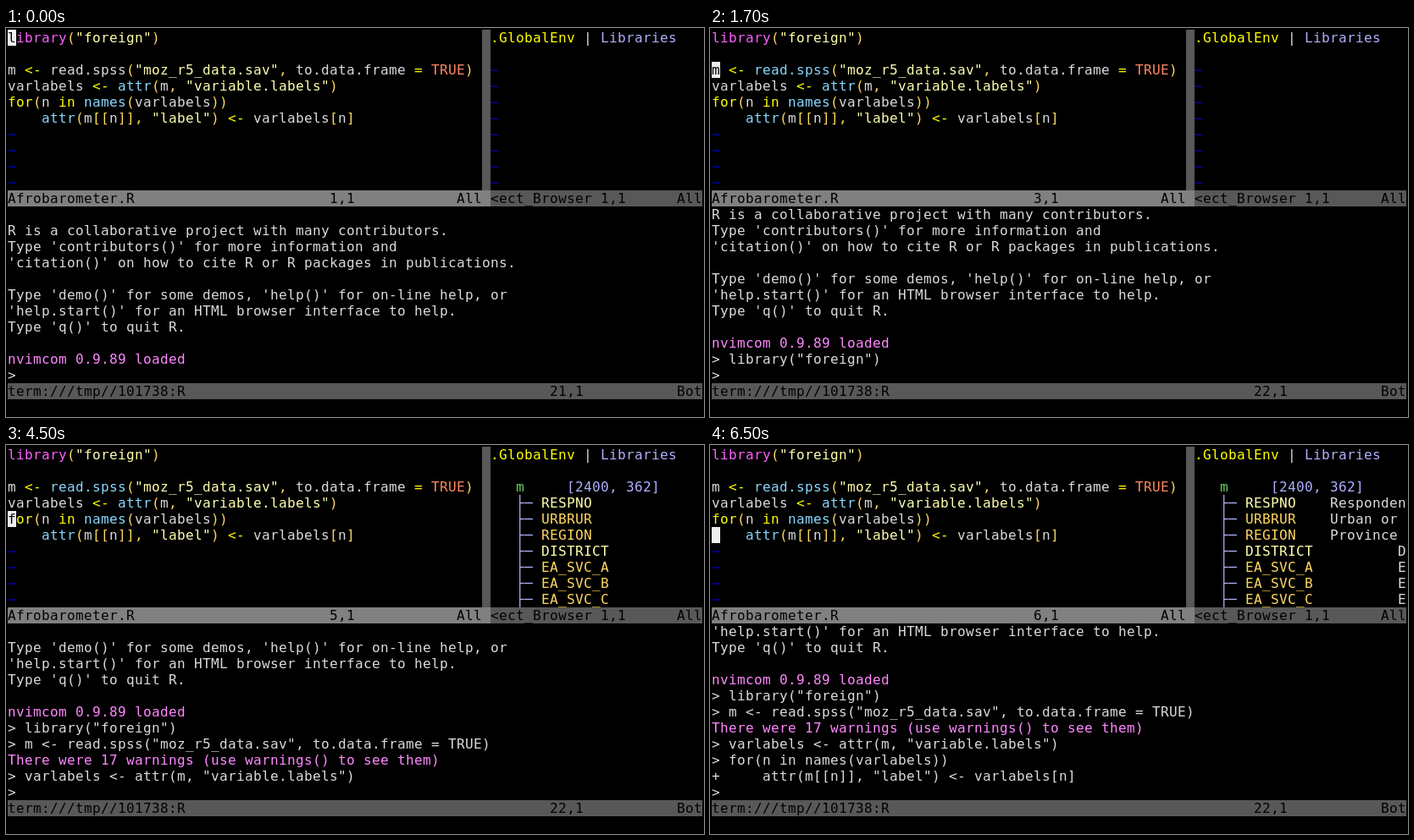
Animation, 824 px wide and 460 px high, one loop 8000 ms. Source, as an HTML page:

```html
<!DOCTYPE html>
<html lang="en">
<head>
<meta charset="utf-8">
<title>R session</title>
<style>
html, body { margin: 0; width: 100%; height: 100%; overflow: hidden; background: #000; }
#term {
  position: absolute; left: 2px; top: 2px; width: 820px; height: 456px;
  font: 16px/19px "DejaVu Sans Mono", monospace;
  letter-spacing: calc(10px - 1ch);
  color: #dadada;
}
#term span { position: absolute; height: 19px; white-space: pre; }
</style>
</head>
<body>
<div id="term"></div>
<script>
const CW = 10, CH = 19, LOOP = 8000;
const C = {
  text: '#dadada', pink: '#ff5fff', msg: '#ff87ff', gold: '#ffd75f', string: '#ffffaf',
  key: '#ffff00', func: '#87d7ff', bool: '#ff875f', tilde: '#0000cd', lilac: '#afafff',
  green: '#5fd75f', active: '#808080', idle: '#585858', cursor: '#eeeeee', black: '#000'
};

const script = [
  'library("foreign")',
  '',
  'm <- read.spss("moz_r5_data.sav", to.data.frame = TRUE)',
  'varlabels <- attr(m, "variable.labels")',
  'for(n in names(varlabels))',
  '    attr(m[[n]], "label") <- varlabels[n]'
];

const log = [
  '',
  'R is a collaborative project with many contributors.',
  "Type 'contributors()' for more information and",
  "'citation()' on how to cite R or R packages in publications.",
  '',
  "Type 'demo()' for some demos, 'help()' for on-line help, or",
  "'help.start()' for an HTML browser interface to help.",
  "Type 'q()' to quit R.",
  '',
  'nvimcom 0.9.89 loaded',
  '> ' + script[0],
  '> ' + script[2],
  'There were 17 warnings (use warnings() to see them)',
  '> ' + script[3],
  '> ' + script[4],
  '+ ' + script[5]
];

const columns = [
  ['RESPNO', C.string, 73, 'Responden'],
  ['URBRUR', C.gold, 73, 'Urban or'],
  ['REGION', C.gold, 73, 'Province'],
  ['DISTRICT', C.string, 81, 'D'],
  ['EA_SVC_A', C.gold, 81, 'E'],
  ['EA_SVC_B', C.gold, 81, 'E'],
  ['EA_SVC_C', C.gold, 81, 'E']
];

// at: start time, row: cursor row, lines: console lines so far, tree: browser detail
const steps = [
  { at: 0, row: 0, lines: 10, tree: 0 },
  { at: 500, row: 2, lines: 11, tree: 0 },
  { at: 2500, row: 3, lines: 13, tree: 1 },
  { at: 4500, row: 4, lines: 14, tree: 1 },
  { at: 6500, row: 5, lines: 16, tree: 2 }
];

const term = document.getElementById('term');

function put(col, row, text, color = C.text, bg, cells) {
  const s = document.createElement('span');
  s.textContent = text;
  s.style.left = col * CW + 'px';
  s.style.top = row * CH + 'px';
  s.style.color = color;
  if (bg) {
    s.style.background = bg;
    s.style.width = cells * CW + 'px';
  }
  term.append(s);
}

function tokenColor(tok, loaded) {
  if (tok[0] === '"') return C.string;
  if (tok === 'library') return C.pink;
  if (tok === 'TRUE') return C.bool;
  if (tok === 'read.spss') return loaded ? C.func : C.text;
  if (/^(attr|names)$/.test(tok)) return C.func;
  if (/^(for|in|<-|=)$/.test(tok)) return C.key;
  if (/^[()[\],]$/.test(tok)) return C.gold;
  return C.text;
}

function drawCode(line, row, loaded) {
  for (const m of line.matchAll(/"[^"]*"|[\w.]+|<-|[^\s]/g))
    put(m.index, row, m[0], tokenColor(m[0], loaded));
}

function drawEditor(step) {
  script.forEach((line, row) => drawCode(line, row, step.at > 0));
  for (let row = 6; row < 10; row++) put(0, row, '~', C.tilde);
  put(0, step.row, script[step.row][0], C.black, C.cursor, 1);
  for (let row = 0; row < 10; row++) put(56, row, '', C.text, C.idle, 1);
  put(0, 10, 'Afrobarometer.R', C.black, C.active, 57);
  put(38, 10, step.row + 1 + ',1', C.black);
  put(53, 10, 'All', C.black);
}

function drawBrowser(step) {
  put(57, 0, '.GlobalEnv', C.key);
  put(68, 0, '|');
  put(70, 0, 'Libraries', C.lilac);
  if (step.tree) {
    put(60, 2, 'm', C.green);
    put(66, 2, '[2400, 362]', C.lilac);
    columns.forEach(([name, color, col, label], i) => {
      put(60, 3 + i, '├─', C.lilac);
      put(63, 3 + i, name, color);
      if (step.tree > 1) put(col, 3 + i, label);
    });
  } else {
    for (let row = 2; row < 10; row++) put(57, row, '~', C.tilde);
  }
  put(57, 10, '<ect_Browser 1,1', C.black, C.idle, 25);
  put(79, 10, 'All', C.black);
}

function drawConsole(step) {
  log.slice(step.lines - 10, step.lines).forEach((line, i) =>
    put(0, 11 + i, line, /^(nvimcom|There)/.test(line) ? C.msg : C.text));
  put(0, 21, '>');
  put(0, 22, 'term:///tmp//101738:R', C.black, C.idle, 82);
  put(64, 22, (step.at ? 22 : 21) + ',1', C.black);
  put(79, 22, 'Bot', C.black);
}

let shown = null;
function tick() {
  const t = performance.now() % LOOP;
  const step = steps.filter(s => s.at <= t).pop();
  if (step !== shown) {
    shown = step;
    term.replaceChildren();
    drawEditor(step);
    drawBrowser(step);
    drawConsole(step);
  }
  requestAnimationFrame(tick);
}
tick();
</script>
</body>
</html>
```
